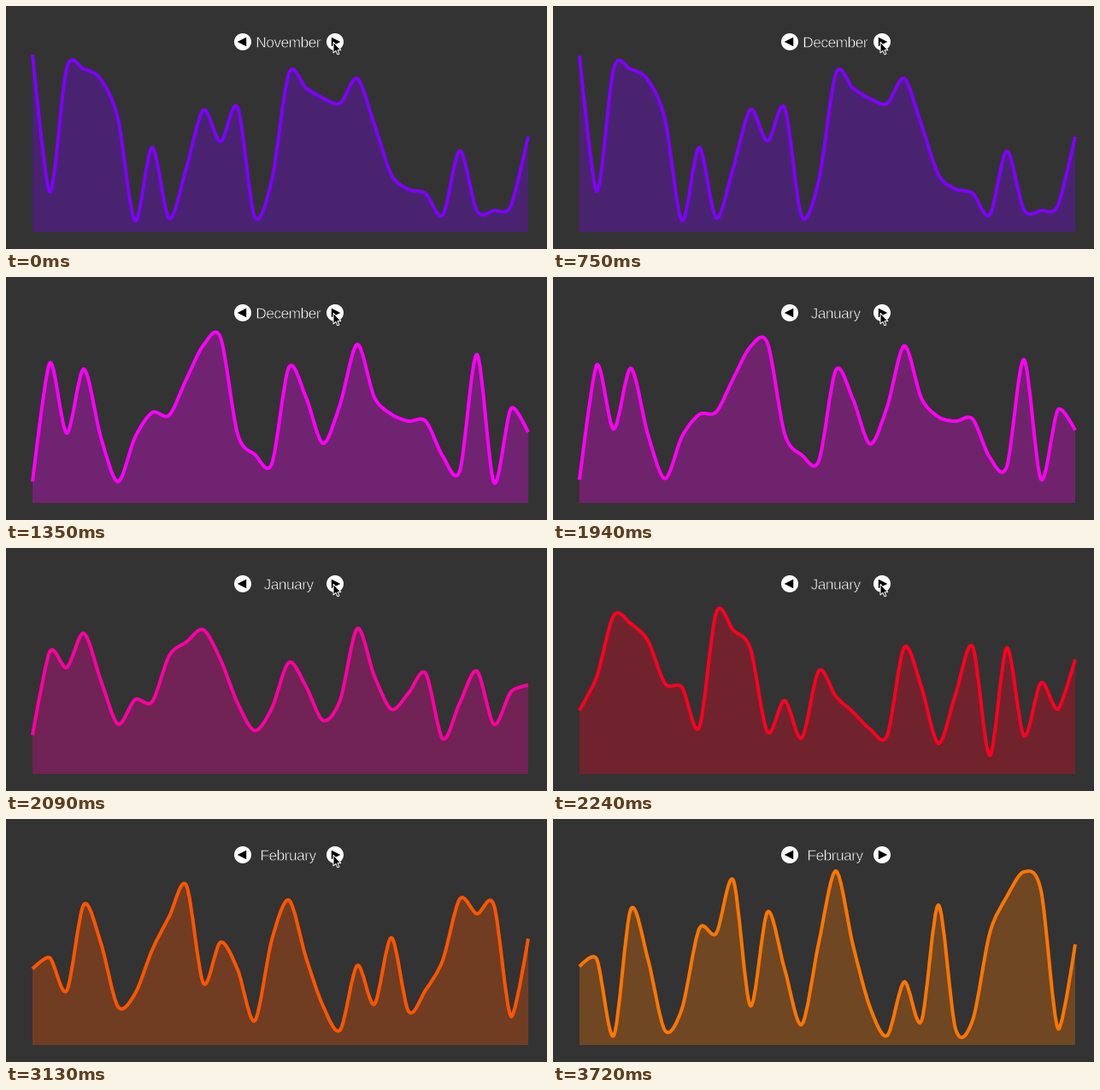
Recreate the animation shown at these times as a matplotlib script. Size 633 by 285 pixels, loop 4.18 s.

```python
import numpy as np
import matplotlib.pyplot as plt
from matplotlib.animation import FuncAnimation
from matplotlib.patches import Circle, PathPatch, Polygon
from matplotlib.path import Path
from matplotlib.textpath import TextPath
from matplotlib.transforms import Affine2D

W, H, DPI = 633, 285, 64
LOOP, STEP = 4180, 10
TICK, MORPH = 150, 640
BG = "#333333"
BASE = 265
X = 31 + 20 * np.arange(30)

# month name, line colour, curve heights
MONTHS = [
    ("November", (127, 0, 255),
     [57, 218, 73, 74, 86, 132, 252, 166, 249, 190,
      122, 159, 119, 247, 204, 79, 96, 108, 114, 85,
      139, 198, 215, 220, 245, 170, 240, 240, 234, 153]),
    ("December", (255, 0, 255),
     [240, 101, 183, 108, 188, 240, 188, 159, 162, 120,
      80, 71, 184, 208, 219, 106, 141, 195, 149, 79,
      141, 161, 169, 169, 210, 227, 91, 241, 154, 182]),
    ("January", (255, 0, 0),
     [183, 159, 64, 86, 97, 147, 160, 218, 63, 93,
      124, 237, 178, 225, 133, 184, 200, 215, 230, 122,
      166, 239, 172, 108, 248, 101, 239, 146, 194, 123]),
    ("February", (255, 118, 0),
     [173, 164, 254, 106, 164, 248, 222, 129, 134, 72,
      219, 109, 176, 241, 145, 61, 148, 221, 254, 191,
      237, 101, 246, 236, 134, 91, 62, 84, 246, 147]),
]
NAMES = [m[0] for m in MONTHS]
COLORS = [np.array(m[1]) / 255 for m in MONTHS]
CURVES = [np.array(m[2], float) for m in MONTHS]

# click time, lead-in of the morph, last tick
CLICKS = [(750, 77, 4), (1940, 137, 3), (2830, 77, 4)]
# time from which the pointer's corner stands at x, y
POINTER = [(0, 382, 40.5), (3280, 497, 160), (3430, 596, 267),
           (3580, 597, 283), (3720, 0, 400)]


def px(width):
    return width * 72 / DPI


def ease(t):
    t = min(max(t, 0), 1)
    return 4 * t ** 3 if t < 0.5 else 1 - 4 * (1 - t) ** 3


def cardinal(y):
    """Open cardinal spline (tension 0.7) as vertices and codes."""
    p = np.column_stack([X, y])
    t = 0.15 * (p[2:] - p[:-2])
    verts = [p[0], p[1] - t[0] * 2 / 3, p[1]]
    codes = [Path.MOVETO] + [Path.CURVE3] * 2
    for i in range(1, len(p) - 2):
        verts += [p[i] + t[i - 1], p[i + 1] - t[i], p[i + 1]]
        codes += [Path.CURVE4] * 3
    verts += [p[-2] + t[-1] * 2 / 3, p[-1]]
    codes += [Path.CURVE3] * 2
    return verts, codes


def text_path(text, size=17.3, tracking=-0.5, cx=331, base=48.5):
    def glyphs(s):
        return TextPath((0, 0), s, size=size, prop={"family": "Liberation Sans"})

    bars = glyphs("||").get_extents().width
    parts, x = [], 0
    for ch in text:
        parts.append(Affine2D().translate(x, 0).transform_path(glyphs(ch)))
        x += glyphs("|" + ch + "|").get_extents().width - bars + tracking
    path = Path.make_compound_path(*parts)
    box = path.get_extents()
    place = Affine2D().translate(-(box.x0 + box.x1) / 2, 0).scale(1, -1)
    return place.translate(cx, base).transform_path(path)


def state(now):
    """Month shown, the one before it, and the progress between them."""
    month, progress = 0, 1.0
    for i, (start, lead, last) in enumerate(CLICKS, 1):
        if now >= start:
            ticks = min((now - start) // TICK, last)
            month, progress = i, ease((ticks * TICK + lead) / MORPH)
    return month, max(month - 1, 0), progress


fig = plt.figure(figsize=(W / DPI, H / DPI), dpi=DPI, facecolor=BG)
ax = fig.add_axes([0, 0, 1, 1])
ax.set_xlim(0, W)
ax.set_ylim(H, 0)
ax.axis("off")

blank = Path([(0, 0), (1, 1)])
area = ax.add_patch(PathPatch(blank, lw=0, alpha=0.3))
line = ax.add_patch(PathPatch(blank, fill=False, lw=px(4),
                              capstyle="butt", joinstyle="miter"))

for cx, side in ((277, -1), (385, 1)):
    ax.add_patch(Circle((cx, 42), 10, fc="white", lw=0))
    ax.add_patch(Polygon([(cx + 6.3 * side, 42), (cx - 4.2 * side, 36.7),
                          (cx - 4.2 * side, 47.3)], fc="black", lw=0))

# a thin edge in the background colour slims the letters
LABELS = [text_path(name) for name in NAMES]
label = ax.add_patch(PathPatch(LABELS[0], fc="white", ec=BG, lw=px(0.5)))

ARROW = np.array([(1, 1.8), (1, 14.6), (3.9, 11.9), (5.9, 16.4),
                  (7.9, 15.6), (5.9, 11.2), (9.9, 11.2)])
pointer = ax.add_patch(Polygon(ARROW, fc="black", ec="white", lw=px(1),
                               joinstyle="miter", zorder=5))


def update(frame):
    now = frame * STEP
    month, prev, p = state(now)
    verts, codes = cardinal(CURVES[prev] + p * (CURVES[month] - CURVES[prev]))
    color = COLORS[prev] + p * (COLORS[month] - COLORS[prev])

    line.set_path(Path(verts, codes))
    line.set_edgecolor(color)
    area.set_path(Path(verts + [(X[-1], BASE), (X[0], BASE), verts[0]],
                       codes + [Path.LINETO] * 2 + [Path.CLOSEPOLY]))
    area.set_facecolor(color)
    label.set_path(LABELS[month])

    _, x, y = [stop for stop in POINTER if stop[0] <= now][-1]
    pointer.set_xy(ARROW + (x, y))
    return area, line, label, pointer


anim = FuncAnimation(fig, update, frames=LOOP // STEP, interval=STEP,
                     repeat=True, cache_frame_data=False)
plt.show()
```
